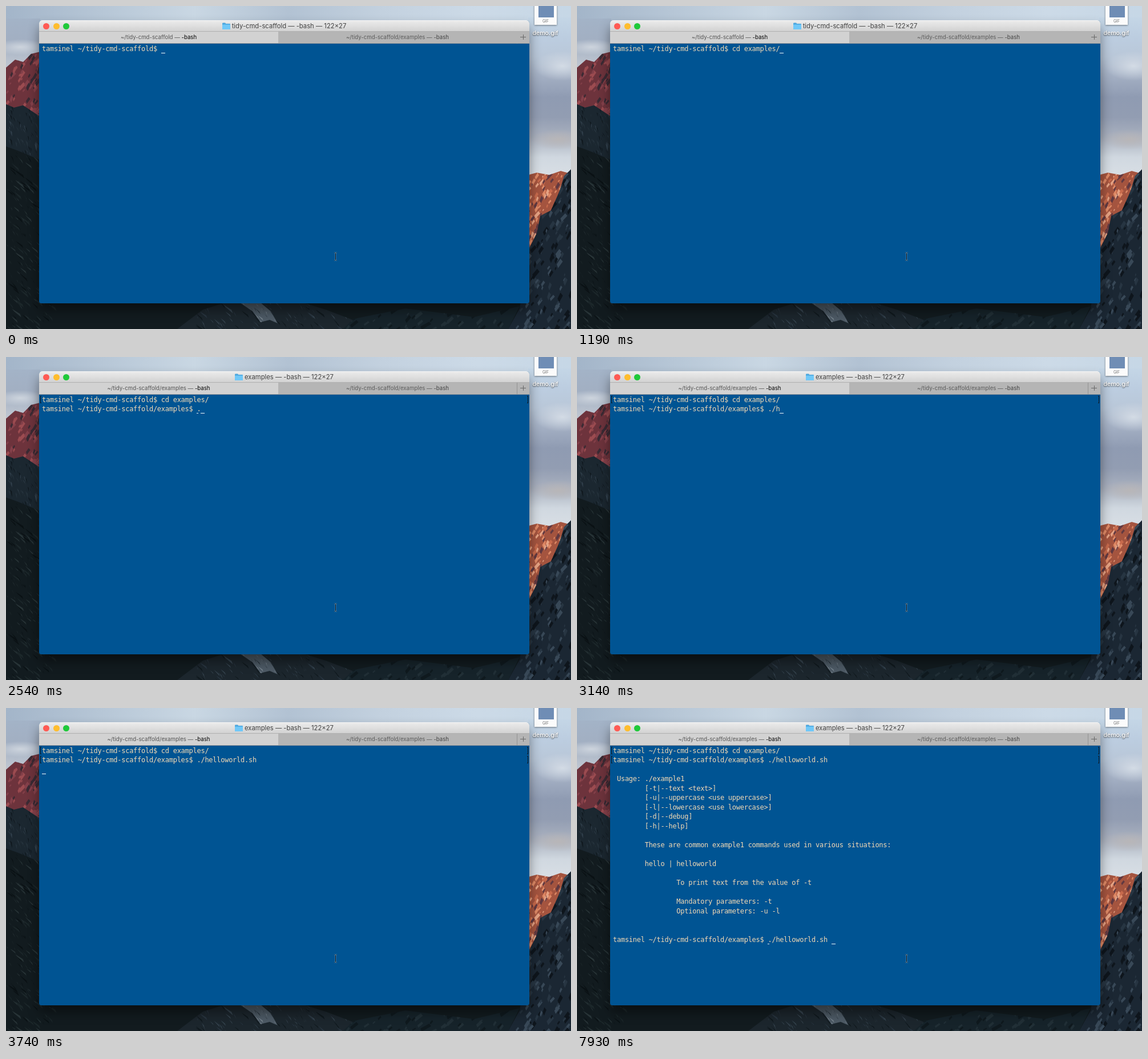
An HTML page with a canvas for the animation above (8 s loop, 990 px wide and 566 px high).

```html
<!DOCTYPE html>
<html lang="en">
<head>
<meta charset="utf-8">
<title>Terminal session</title>
<style>
html, body { margin: 0; width: 100%; height: 100%; overflow: hidden; background: #141c20; }
#stage { position: relative; width: 990px; height: 566px; overflow: hidden; font-family: Inter, sans-serif; }
#stage * { box-sizing: border-box; }
#wall, .abs { position: absolute; }
#wall { left: 0; top: 0; }
#shadow, #window { left: 58px; top: 25px; width: 859px; height: 496px; border-radius: 5px 5px 4px 4px; }
#shadow { box-shadow: 0 12px 20px rgba(0,0,0,.42); }
#window { background: #005493; overflow: hidden; }
#bar {
  left: 0; top: 0; width: 859px; height: 20px; background: linear-gradient(#ebebeb, #d2d2d2);
  border-top: 1px solid #f4f4f4; border-bottom: 1px solid #b0b0b0;
  display: flex; align-items: center; justify-content: center; font-size: 11.25px; color: #414141; white-space: pre;
}
#bar svg { margin-right: 3px; }
.light { width: 11px; height: 11px; border-radius: 50%; top: 4.5px; }
.tab {
  top: 20px; height: 21px; line-height: 20px; font-size: 9.65px; text-align: center; white-space: pre;
  background: #b5b5b5; color: #5c5c5c; border-bottom: 1px solid #9c9c9c;
}
.tab b { font-weight: 400; }
#tabA { left: 0; width: 419px; background: #d2d2d2; color: #555; }
#tabA b { color: #000; }
#tabB { left: 419px; width: 418px; }
#tabB b { color: #444; }
#plus { left: 837px; width: 22px; border-left: 1px solid transparent; }
#plus::before, #plus::after { content: ""; position: absolute; background: #686868; }
#plus::before { left: 5px; top: 9px; width: 10px; height: 1px; }
#plus::after { left: 9.5px; top: 5px; width: 1px; height: 9px; }
.row {
  position: absolute; left: 63px; height: 16px; line-height: 16px; white-space: pre; color: #f3d9b4;
  font-family: "DejaVu Sans Mono", monospace; font-size: 12px; letter-spacing: -.264px;
}
.caret { position: absolute; height: 1px; background: #fff; }
.mark { position: absolute; width: 2px; height: 13px; border: 1px solid #101820; }
.mark.l { left: 60px; border-right: 0; }
.mark.r { left: 913px; border-left: 0; }
#paper { left: 926px; top: -8px; width: 39px; height: 41px; background: #fbfbfb; box-shadow: 0 1px 3px rgba(0,0,0,.45); }
#badge { left: 933px; top: -7px; width: 27px; height: 27px; background: #6f8db5; }
#kind { left: 926px; top: 22px; width: 39px; font-size: 7px; line-height: 9px; text-align: center; color: #777; }
#file {
  left: 905px; top: 41px; width: 80px; font-size: 10.4px; line-height: 14px; text-align: center; font-weight: 600;
  color: #fff; text-shadow: 0 1px 2px rgba(0,0,0,.75);
}
#beam { left: 573px; top: 431px; }
</style>
</head>
<body>
<div id="stage">
  <canvas id="wall" width="990" height="566"></canvas>
  <div class="abs" id="paper"></div>
  <div class="abs" id="badge"></div>
  <div class="abs" id="kind">GIF</div>
  <div class="abs" id="file">demo.gif</div>
  <div class="abs" id="shadow"></div>
  <div class="abs" id="window">
    <div class="abs" id="bar">
      <svg width="14" height="12" viewBox="0 0 14 12">
        <path d="M0 2Q0 .5 1 .5H5L6.3 2H13Q14 2 14 3V11Q14 12 13 12H1Q0 12 0 11Z" fill="#4ba6de"/>
        <path d="M0 3.6H14V11Q14 12 13 12H1Q0 12 0 11Z" fill="#70c8f8"/>
      </svg><span id="title"></span>
    </div>
    <div class="abs light" style="left:6.5px;background:#ff5b54"></div>
    <div class="abs light" style="left:24.5px;background:#ffbd2e"></div>
    <div class="abs light" style="left:41.5px;background:#1fc93a"></div>
    <div class="abs tab" id="tabA"><span id="path"></span> — <b>-bash</b></div>
    <div class="abs tab" id="tabB"><span id="path2"></span> — <b>-bash</b></div>
    <div class="abs tab" id="plus"></div>
  </div>
  <div id="screen"></div>
  <svg class="abs" id="beam" width="10" height="16" fill="none">
    <defs><path id="stem" d="M2.5 1.5H3.5L4.5 2.5L5.5 1.5H6.5M4.5 2.5V13.5M2.5 14.5H3.5L4.5 13.5L5.5 14.5H6.5"/></defs>
    <use href="#stem" stroke="#c8d4de" stroke-opacity=".55" stroke-width="2"/>
    <use href="#stem" stroke="#0c1218"/>
  </svg>
</div>
<script>
const $ = id => document.getElementById(id);
const LOOP = 8000, CELL = 6.96, LINE = 16.55, LEFT = 63;

// Wallpaper
const g = $('wall').getContext('2d');
let seed = 7;
const rnd = () => (seed = seed * 16807 % 2147483647) / 2147483647;

function fade(x, y, w, h, ...colors) {
  const grad = g.createLinearGradient(x, y, w > h ? x + w : x, w > h ? y : y + h);
  colors.forEach((c, i) => grad.addColorStop(i / (colors.length - 1), c));
  g.fillStyle = grad;
  g.fillRect(x, y, w, h);
}

function poly(color, ...pts) {
  g.fillStyle = color;
  g.beginPath();
  for (let i = 0; i < pts.length; i += 2) g.lineTo(pts[i], pts[i + 1]);
  g.fill();
}

// Leaning slivers, clipped to the last drawn shape
function shards(n, colors, x, y, w, h, lean, size) {
  g.save();
  g.clip();
  for (let i = 0; i < n; i++) {
    const a = x + rnd() * w, b = y + rnd() * h, s = size * (.4 + rnd()), k = lean * (.4 + rnd());
    poly(colors[i % colors.length], a, b, a + s * .25, b + s * .3, a + s * k + s * .15, b + s, a + s * k, b + s * .6);
  }
  g.restore();
}

function cloud(x, y, rx, ry, color) {
  g.save();
  g.translate(x, y);
  g.scale(rx, ry);
  const grad = g.createRadialGradient(0, 0, 0, 0, 0, 1);
  grad.addColorStop(0, color);
  grad.addColorStop(1, color + '00');
  g.fillStyle = grad;
  g.fillRect(-1, -1, 2, 2);
  g.restore();
}

function paintWall() {
  fade(0, 0, 990, 40, '#a3b5c9', '#b6c6d6', '#c9d7e3', '#b2c2d3', '#c3d1df', '#ccdae7', '#c6d7e6');
  fade(0, 22, 60, 120, '#a3b3c7', '#a2afc2', '#bdc5d0', '#b3bbc8');
  fade(915, 20, 75, 280, '#c4d6e6', '#bccde0', '#b9c7d8', '#a2aec2', '#8f9bb2', '#929db2', '#aab1bf', '#d0d8e0', '#d9dfe5');
  cloud(975, 105, 50, 26, '#d3dbe5');
  cloud(968, 234, 48, 18, '#b8b6b8');
  cloud(25, 72, 45, 14, '#cdd4dd');

  poly('#6d333c', 0, 108, 16, 94, 30, 98, 44, 84, 60, 80, 60, 205, 0, 180);
  shards(110, ['#9b4b50', '#3a2a33', '#84404a'], 0, 80, 70, 110, -.4, 11);
  poly('#1b2730', 0, 172, 14, 178, 30, 174, 60, 194, 60, 285, 0, 285);
  shards(90, ['#34434f', '#0f171d', '#25323c'], 0, 170, 60, 100, .3, 12);
  poly('#121b1f', 0, 246, 22, 254, 60, 270, 60, 520, 990, 515, 990, 566, 0, 566);
  shards(260, ['#283437', '#0a1114', '#1c272a'], 0, 250, 75, 320, .7, 11);

  poly('#a4543f', 900, 300, 930, 292, 952, 296, 972, 289, 990, 294, 990, 440, 900, 440);
  shards(180, ['#df8a66', '#613941', '#c76a4c', '#e5a283'], 905, 285, 85, 140, -.4, 10);
  poly('#1b2733', 990, 286, 978, 298, 970, 324, 955, 358, 936, 368, 930, 398, 917, 424, 900, 530, 880, 566, 990, 566);
  shards(200, ['#384857', '#0e151c', '#273542'], 890, 290, 100, 276, -.4, 13);

  poly('#1c262d', 300, 566, 345, 532, 390, 518, 515, 518, 560, 532, 650, 566);
  shards(120, ['#35434e', '#10191e', '#283540'], 310, 515, 330, 50, .7, 11);
  poly('#4d5a65', 410, 520, 446, 520, 464, 535, 476, 556, 462, 550, 446, 554, 432, 535);
  shards(36, ['#7c8892', '#2b3640'], 405, 515, 70, 40, .6, 9);
  poly('#16232a', 610, 548, 700, 530, 820, 545, 900, 526, 880, 566, 590, 566);
  shards(60, ['#212f36', '#0f191e'], 600, 525, 290, 40, -.8, 11);
}

// Terminal session
const ROOT = '~/tidy-cmd-scaffold', DEEP = ROOT + '/examples';
const P1 = 'tamsinel ' + ROOT + '$ ', P2 = 'tamsinel ' + DEEP + '$ ';
const pad = ' '.repeat(8);
const first = P1 + 'cd examples/', run = './helloworld.sh';
const help = [
  '', ' Usage: ./example1',
  ...['[-t|--text <text>]', '[-u|--uppercase <use uppercase>]', '[-l|--lowercase <use lowercase>]',
    '[-d|--debug]', '[-h|--help]', '',
    'These are common example1 commands used in various situations:', '',
    'hello | helloworld', '',
    pad + 'To print text from the value of -t', '',
    pad + 'Mandatory parameters: -t', pad + 'Optional parameters: -u -l'].map(s => pad + s),
  '', ''
];
const typed = s => [first, P2 + s];
const done = s => [first, P2 + run, ...help, P2 + s];

// start, rows, finished commands, column and width of a lingering caret
const steps = [
  [0, [P1], 0],
  [440, [P1 + 'c'], 0, 30, 1],
  [590, [P1 + 'cd '], 0, 30, 1],
  [740, [P1 + 'cd '], 0],
  [890, [P1 + 'cd e'], 0],
  [1190, [first], 0],
  [1640, typed(''), 1],
  [2540, typed('.'), 1, 39, 3],
  [2690, typed('./'), 1, 39, 3],
  [2840, typed('./'), 1],
  [2990, typed('./h'), 1, 41, 1],
  [3140, typed('./h'), 1],
  [3290, typed(run + ' '), 1],
  [3740, [...typed(run), ''], 2],
  [3890, done(''), 2],
  [7930, done(run + ' '), 2, 39, 3]
];

function add(cls, top, text = '') {
  const el = document.createElement('div');
  el.className = cls;
  el.style.top = top + 'px';
  el.textContent = text;
  $('screen').append(el);
  return el;
}

function caret(col, row, width) {
  const el = add('caret', Math.floor(82 + LINE * row));
  el.style.left = Math.round(LEFT + CELL * col) + 'px';
  el.style.width = width + 'px';
}

function show([, rows, finished, col, width]) {
  $('screen').textContent = '';
  rows.forEach((s, i) => add('row', Math.floor(67 + LINE * i), s));
  for (let i = 0; i < finished; i++)
    for (const side of ['l', 'r']) add('mark ' + side, Math.floor(68 + LINE * i));
  const last = rows.length - 1;
  caret(rows[last].length, last, 7);
  if (width) caret(col, last, width);
  const path = finished ? DEEP : ROOT;
  $('path').textContent = path;
  $('title').textContent = path.split('/').pop() + ' — -bash — 122×27';
  $('plus').style.borderLeftColor = finished ? '#929292' : 'transparent';
}

let shown = null;
function tick() {
  const t = performance.now() % LOOP;
  const step = steps.findLast(s => s[0] <= t);
  if (step !== shown) show(shown = step);
  requestAnimationFrame(tick);
}

paintWall();
$('path2').textContent = DEEP;
tick();
</script>
</body>
</html>
```
